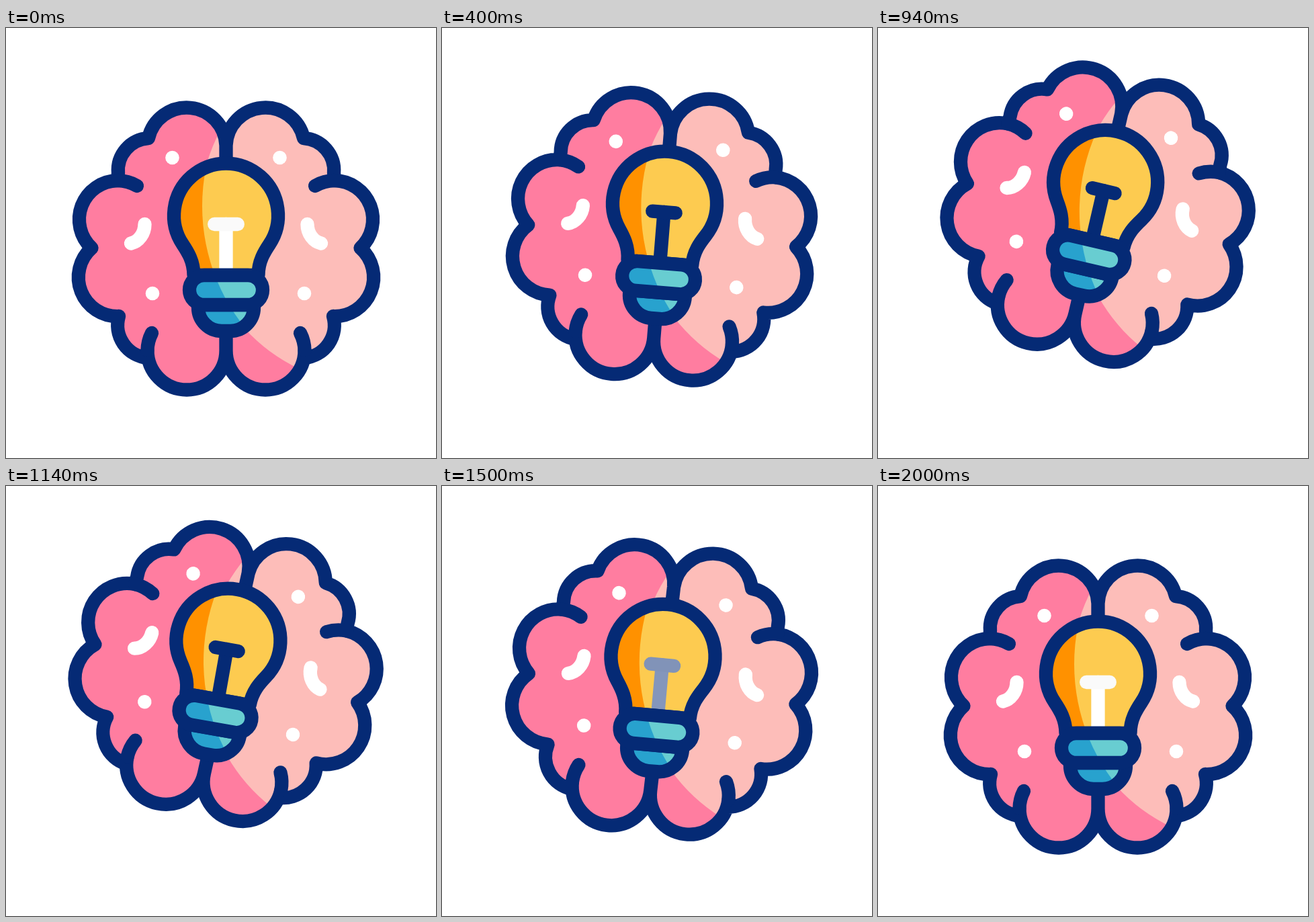
Write an HTML page with a canvas that moves like this. It is 640 by 640 pixels and loops after 2020 ms.

```html
<!DOCTYPE html>
<html lang="en">
<head>
<meta charset="utf-8">
<title>Bright idea</title>
<style>
html, body { margin: 0; width: 100%; height: 100%; overflow: hidden; background: #fff; }
canvas { display: block; width: 640px; height: 640px; }
</style>
</head>
<body>
<canvas id="stage" width="640" height="640"></canvas>
<script>
const ctx = document.getElementById('stage').getContext('2d');
const LOOP = 2020, MID = 327.5;
const NAVY = '#052a75', PINK = '#ff7da0', BLUSH = '#fdbdb9', ORANGE = '#ff9100',
      YELLOW = '#fdcb50', BLUE = '#28a2ce', TEAL = '#68cdd1';

// Shapes are drawn with x measured from the axis of symmetry.
function both(d) {
  const half = new Path2D(d), path = new Path2D(half);
  path.addPath(half, new DOMMatrix([-1, 0, 0, 1, 0, 0]));
  return path;
}
function disc(x, y, r) {
  const path = new Path2D();
  path.arc(x, y, r, 0, Math.PI * 2);
  return path;
}

const lobes = both('M0 175A58.5 58.5 0 0 1 115.5 164A48 48 0 0 1 160.5 216L161.5 227' +
  'A58 58 0 0 1 200 327.5A58 58 0 0 1 159.5 429A49 49 0 0 1 117 491L117 480A58.5 58.5 0 0 1 0 480Z');
const folds = both('M132.5 235A58 58 0 0 1 161.5 227M110.5 454A58.5 58.5 0 0 1 117 480');
const curls = both('M121 292C121 306 130 318 141.5 320.5');
const dots = [[-80, 193], [80, 193], [-109.5, 395], [116.5, 395]].map(([x, y]) => disc(x, y, 10.3));
const brainLight = disc(219, 274, 258);

const glass = new Path2D('M-48 368C-48 347 -57.5 332.5 -64.5 322A77.5 77.5 0 1 1 64.5 322C57.5 332.5 48 347 48 368Z');
const cup = new Path2D('M-41.5 412V416A35 35 0 0 0 -6.5 451H6.5A35 35 0 0 0 41.5 416V412Z');
const collar = new Path2D('M-32.5 368H32.5A22 22 0 0 1 32.5 412H-32.5A22 22 0 0 1 -32.5 368Z');
const stem = new Path2D('M0 292V368');
const bar = new Path2D('M-17.3 292H17.3');
const bulbLight = disc(254.5, 265, 290);

function fillTwo(shape, dark, light, edge) {
  ctx.save();
  ctx.fillStyle = dark;
  ctx.fill(shape);
  ctx.clip(shape);
  ctx.fillStyle = light;
  ctx.fill(edge);
  ctx.restore();
}
function stroke(path, color = NAVY) {
  ctx.strokeStyle = color;
  ctx.stroke(path);
}

const ramp = (t, a, b) => Math.min(1, Math.max(0, (t - a) / (b - a)));
const ease = x => x * x * (3 - 2 * x);
const bump = (t, a, m, b) => t < m ? ease(ramp(t, a, m)) : 1 - ease(ramp(t, m, b));
const rad = deg => deg * Math.PI / 180;
const blend = (k, to) => `rgb(${[5, 42, 117].map(c => Math.round(c + (to - c) * k)).join()})`;

function drawBrain() {
  fillTwo(lobes, PINK, BLUSH, brainLight);
  stroke(lobes);
  stroke(folds);
  stroke(curls, '#fff');
  ctx.fillStyle = '#fff';
  dots.forEach(d => ctx.fill(d));
}

function drawBulb(glow) {
  fillTwo(glass, ORANGE, YELLOW, bulbLight);
  stroke(stem, blend(glow, 255));
  stroke(bar, blend(glow, 250));
  stroke(glass);
  for (const part of [cup, collar]) {
    fillTwo(part, BLUE, TEAL, bulbLight);
    stroke(part);
  }
}

function draw(t) {
  const lift = bump(t, 0, 1000, 2000);
  const tilt = bump(t, 1000, 1300, 1600);
  const glow = 1 - ramp(t, 120, 280) + ramp(t, 1420, 1580);

  ctx.setTransform(1, 0, 0, 1, 0, 0);
  ctx.fillStyle = '#fff';
  ctx.fillRect(0, 0, 640, 640);
  ctx.lineWidth = 20.3;
  ctx.lineCap = ctx.lineJoin = 'round';

  ctx.translate(MID + 0.3 * lift, MID - 51.3 * lift);
  ctx.rotate(rad(13.15 * lift));
  ctx.translate(0, -MID);
  drawBrain();

  // The bulb rocks on its foot.
  ctx.translate(0, 457);
  ctx.rotate(rad(-5.25 * tilt));
  ctx.translate(0, -457);
  drawBulb(glow);
}

function tick() {
  draw(performance.now() % LOOP);
  requestAnimationFrame(tick);
}
tick();
</script>
</body>
</html>
```
